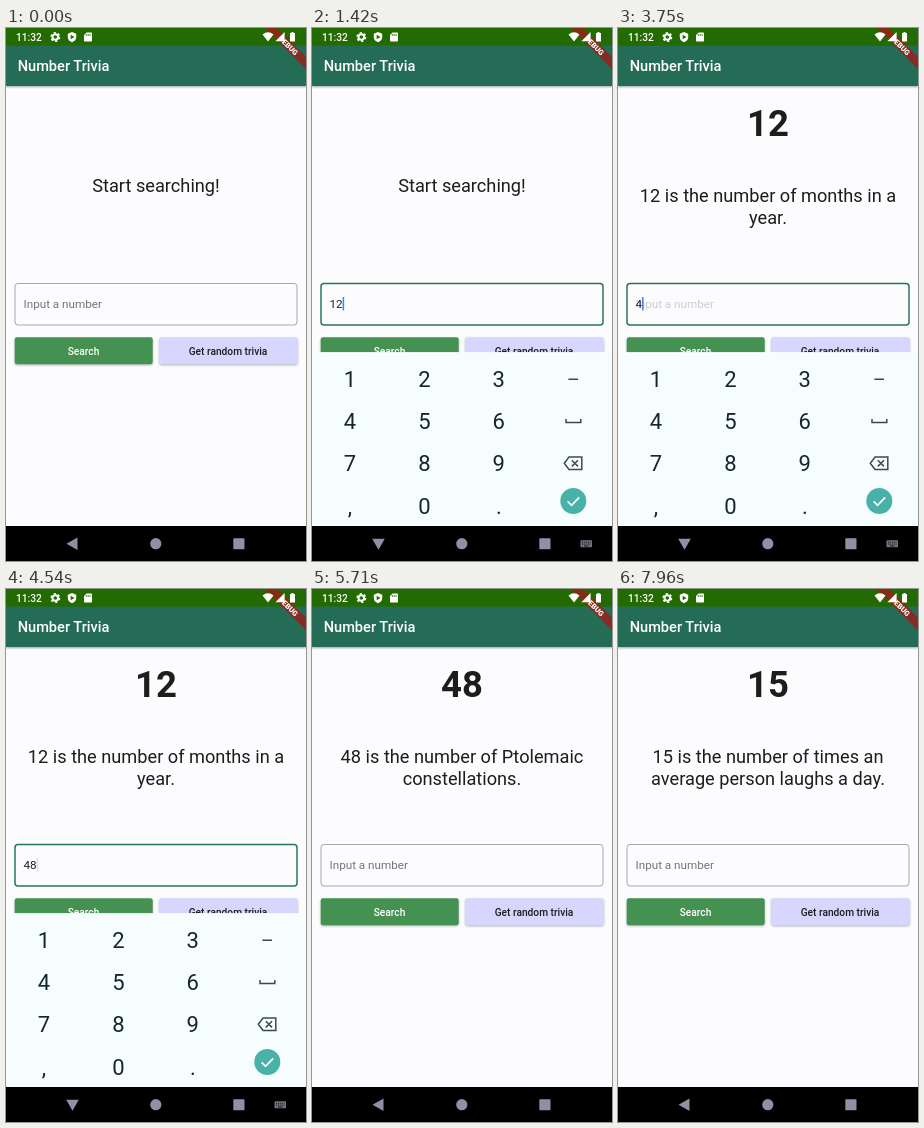
Animation of 300 by 533 pixels, one loop 8000 ms. Source, as an HTML page:

```html
<!DOCTYPE html>
<html lang="en">
<head>
<meta charset="utf-8">
<title>Number Trivia</title>
<style>
  html, body { margin: 0; width: 100%; height: 100%; overflow: hidden; background: #000; }
  svg { display: block; width: 100vw; height: 100vh; }
  text { font-family: Roboto, sans-serif; fill: #1d1d1d; }
  .mid { text-anchor: middle; }
  .title { font-size: 14.6px; font-weight: 500; fill: #fff; }
  .label { font-size: 10.2px; font-weight: 500; }
  .body { font-size: 18.2px; }
  .big { font-size: 36.5px; font-weight: 700; }
  .input { font-size: 11.7px; }
  .key { font-size: 22px; fill: #16262c; }
  .bar { filter: drop-shadow(0 1.2px 1.2px rgba(0, 0, 0, .36)); }
  .button { filter: drop-shadow(0 1px .8px rgba(0, 0, 0, .28)); }
  .line { fill: none; stroke: #3c4a50; stroke-width: 1.5; }
</style>
</head>
<body>
<svg viewBox="0 0 300 533" preserveAspectRatio="none">
  <rect width="300" height="533" fill="#fcfcff"/>

  <g id="content">
    <text id="number" class="big mid" x="150" y="108"></text>
    <text id="line0" class="body mid" x="150"></text>
    <text id="line1" class="body mid" x="150" y="195.6"></text>
    <path id="spinner" fill="none" stroke="#439250" stroke-width="2.9"/>
  </g>

  <rect id="field" x="9" y="255.5" width="282" height="41.5" rx="3" fill="none"/>
  <text id="hint" class="input" x="17.5" y="279.7" style="fill:#757477">Input a number</text>
  <text id="typed" class="input" x="17.5" y="279.7"></text>
  <rect id="cursor" y="269" width="1.5" height="13.5" fill="#3f83ee"/>

  <rect class="button" x="8.7" y="309.3" width="138" height="26.9" rx="2.2" fill="#449151"/>
  <text class="label mid" x="77.5" y="326.5" style="fill:#fff">Search</text>
  <rect class="button" x="153.3" y="309.3" width="138.5" height="26.9" rx="2.2" fill="#d7d6ff"/>
  <text class="label mid" x="222" y="326.5">Get random trivia</text>
  <rect id="inset" y="324.3" width="300" height="174" fill="#fcfcff"/>

  <rect class="bar" y="0" width="300" height="58" fill="#256c57"/>
  <rect width="300" height="17.6" fill="#236b00"/>
  <text class="title" x="11.7" y="43.2">Number Trivia</text>
  <g transform="translate(300 0) rotate(45)">
    <rect x="-32" y="20.4" width="64" height="8.8" fill="#a51717" opacity=".74"/>
    <text class="mid" y="27.5" style="font-size:7.4px;font-weight:900;fill:#fff">DEBUG</text>
  </g>

  <g fill="#fff">
    <text class="label" x="10" y="12.6" style="fill:#fff">11:32</text>
    <circle cx="49.3" cy="9" r="2.8" fill="none" stroke="#fff" stroke-width="2"/>
    <circle cx="49.3" cy="9" r="4.2" fill="none" stroke="#fff" stroke-width="1.6" stroke-dasharray="2.2 2.2"/>
    <path d="M66 4l4.2 1.7v3.2q0 3.7-4.2 5.3-4.2-1.6-4.2-5.3V5.7z"/>
    <path d="M64.7 6.7l3.8 2.3-3.8 2.3z" fill="#236b00"/>
    <path d="M80.6 4.5h4.6q.8 0 .8.8v7.4q0 .8-.8.8h-6.4q-.8 0-.8-.8V7.1z"/>
    <path d="M80.3 6v2M82.2 6v2M84.1 6v2" stroke="#236b00" stroke-width=".8"/>
    <path d="M256.5 6.6q5.5-4.6 11 0L262 13.4z"/>
    <path d="M278.6 4v9.2h-9.2z"/>
    <path d="M284 5.1h1.5V4h2v1.1h1.5v8.4h-5z"/>
  </g>

  <rect y="498" width="300" height="35"/>
  <g fill="#928ea6">
    <path id="back" d="M60.5 515.7l11-6.3v12.6z"/>
    <circle cx="149.8" cy="515.7" r="5.6"/>
    <rect x="227.3" y="510.2" width="11.2" height="11" rx=".8"/>
    <g id="switcher">
      <rect x="268.5" y="512.3" width="11.5" height="7" rx=".7" opacity=".8"/>
      <path d="M270 514.2h8.5M270 516.1h8.5" stroke="#000" stroke-width=".9" stroke-dasharray="1 .9"/>
      <path d="M272 518h4.5" stroke="#000" stroke-width=".8"/>
    </g>
  </g>

  <g id="keyboard">
    <rect y="324.3" width="300" height="173.7" fill="#f5fdff"/>
    <g id="keys"></g>
    <path class="line" d="M256.4 351.3h9.6M254 391v3.4h14.8V391"/>
    <path class="line" d="M252.3 435.3l4.7-6.2h12.8v12.4H257zM259.8 432.2l6.2 6.2M266 432.2l-6.2 6.2"/>
    <circle cx="261.3" cy="473" r="13" fill="#48b2a8"/>
    <path d="M255.6 473.3l4 4 7.6-8" fill="none" stroke="#fff" stroke-width="1.7"/>
  </g>
</svg>

<script>
const LOOP = 8000;
const FOCUS = 600, KEYS_IN = 730, KEYS_OUT = 4775, BLUR = 4695;
const SLIDE = 43;

const $ = id => document.getElementById(id);
const clamp = x => Math.min(1, Math.max(0, x));
const latest = (steps, t) => steps.filter(s => s[0] <= t).pop();

// Each step: time, state, lines of the message.
const screens = [
  [0, "", ["Start searching!"]],
  [2000, "loading"],
  [2780, "12", ["12 is the number of months in a", "year."]],
  [BLUR, "loading"],
  [5600, "48", ["48 is the number of Ptolemaic", "constellations."]],
  [6950, "loading"],
  [7600, "15", ["15 is the number of times an", "average person laughs a day."]],
];
const typing = [[0, ""], [1140, "1"], [1390, "12"], [2000, ""], [3620, "4"], [3980, "48"], [BLUR, ""]];

["123", "456", "789", ",0."].forEach((row, r) => [...row].forEach((char, c) => {
  const key = document.createElementNS("http://www.w3.org/2000/svg", "text");
  key.setAttribute("class", "key mid");
  key.setAttribute("x", 38 + c * 74.4);
  key.setAttribute("y", 359 + r * 42.2);
  key.textContent = char;
  $("keys").append(key);
}));

function set(id, attrs) {
  for (const name in attrs) $(id).setAttribute(name, attrs[name]);
}

function write(id, value = "") {
  if ($(id).textContent !== value) $(id).textContent = value;
}

// Cubic Bezier (.4, 0, .2, 1), solved by bisection.
function fastOutSlowIn(x) {
  if (x <= 0 || x >= 1) return clamp(x);
  let low = 0, high = 1, u;
  for (let i = 0; i < 20; i++) {
    u = (low + high) / 2;
    const bx = 1.2 * u * (1 - u) ** 2 + .6 * u * u * (1 - u) + u ** 3;
    if (bx < x) low = u; else high = u;
  }
  return 3 * u * u * (1 - u) + u ** 3;
}

function spinnerPath(age) {
  const phase = age / 1333 % 1;
  const head = fastOutSlowIn(phase * 2), tail = fastOutSlowIn(phase * 2 - 1);
  const start = Math.PI * (-.5 + tail * 1.5 + age / 2222 * 2 + phase * .5);
  const sweep = Math.max((head - tail) * 1.5 * Math.PI, .001);
  const point = a => `${150 + 13 * Math.cos(a)} ${157 + 13 * Math.sin(a)}`;
  return `M${point(start)}A13 13 0 ${+(sweep > Math.PI)} 1 ${point(start + sweep)}`;
}

function drawContent(t) {
  const [since, state, lines = []] = latest(screens, t);
  const loading = state === "loading";
  write("number", loading ? "" : state);
  write("line0", lines[0]);
  write("line1", lines[1]);
  set("line0", { y: lines.length > 1 ? 174.3 : 163.6 });
  set("spinner", { d: loading ? spinnerPath(t - since) : "" });
}

function drawField(t) {
  const focused = t >= FOCUS && t < BLUR;
  const [since, value] = latest(typing, t);
  const fade = clamp((t - since) / 200);
  const previous = latest(typing, since - 1);
  const wasEmpty = !previous || !previous[1];
  const hint = value ? (wasEmpty ? 1 - fade : 0) : (wasEmpty ? 1 : fade);
  const blink = (t - Math.max(since, FOCUS)) % 1000;

  set("field", { stroke: focused ? "#287553" : "#918e99", "stroke-width": focused ? 1.5 : .8 });
  set("hint", { opacity: hint });
  write("typed", value);
  set("cursor", {
    x: 17.5 + value.length * 6.57,
    opacity: focused ? clamp((600 - blink) / 150) : 0,
  });
}

function drawKeyboard(t) {
  const open = t >= KEYS_IN && t < KEYS_OUT;
  const shown = t < KEYS_OUT
    ? 1 - (1 - clamp((t - KEYS_IN) / 250)) ** 5
    : 1 - clamp((t - KEYS_OUT) / 150) ** 5;
  set("keyboard", { opacity: shown, transform: `translate(0 ${SLIDE * (1 - shown)})` });
  set("inset", { opacity: +open });
  set("switcher", { opacity: +open });
  set("back", { transform: open ? "rotate(-90 66.5 515.7)" : "" });
}

const begin = performance.now();
function frame() {
  const t = (performance.now() - begin) % LOOP;
  drawContent(t);
  drawField(t);
  drawKeyboard(t);
  requestAnimationFrame(frame);
}
frame();
</script>
</body>
</html>
```
